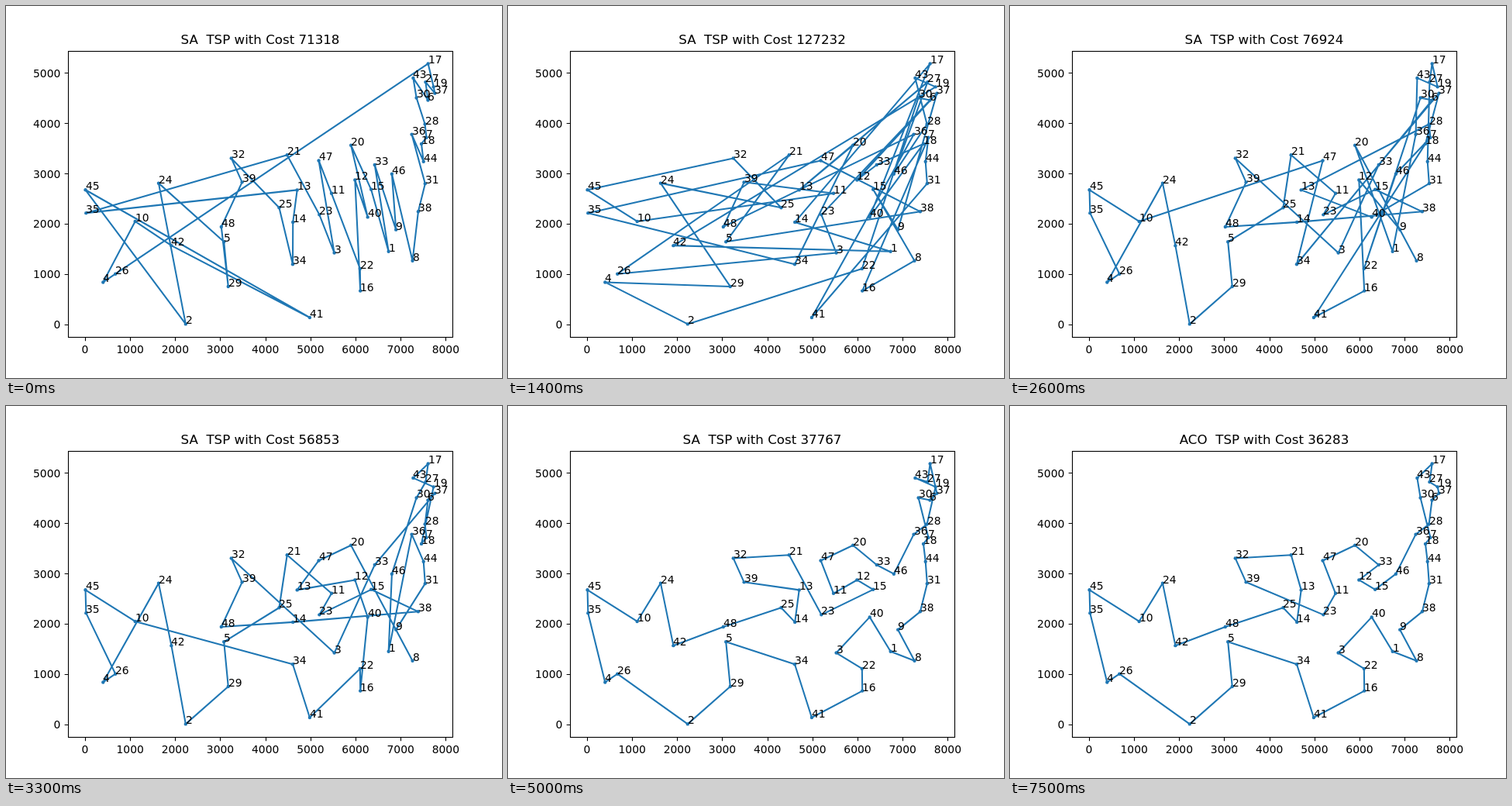
An HTML page with a canvas that plays this animation: 640 by 480 pixels, repeating every 10000 ms.

```html
<!DOCTYPE html>
<html lang="en">
<head>
<meta charset="utf-8">
<title>Travelling salesman tour</title>
<style>
  html, body { margin: 0; width: 100%; height: 100%; overflow: hidden; background: #fff; }
  canvas { display: block; }
</style>
</head>
<body>
<canvas id="plot" width="640" height="480"></canvas>
<script>
const ctx = document.getElementById('plot').getContext('2d');
const LOOP = 10000, STEP = 100;
const FONT = '"DejaVu Sans", sans-serif';
const BLUE = '#1f77b4';
const AXES = { left: 80, right: 576, top: 57.6, bottom: 427.2 };

const parse = text => text.trim().split(/\s+/).map(Number);

// The att48 data set: x and y of cities 1 to 48
const coords = parse(`
  6734 1453 2233 10 5530 1424 401 841 3082 1644 7608 4458 7573 3716 7265 1268
  6898 1885 1112 2049 5468 2606 5989 2873 4706 2674 4612 2035 6347 2683 6107 669
  7611 5184 7462 3590 7732 4723 5900 3561 4483 3369 6101 1110 5199 2182 1633 2809
  4307 2322 675 1006 7555 4819 7541 3981 3177 756 7352 4506 7545 2801 3245 3305
  6426 3173 4608 1198 23 2216 7248 3779 7762 4595 7392 2244 3484 2829 6271 2135
  4985 140 1916 1569 7280 4899 7509 3239 10 2676 6807 2993 5185 3258 3023 1942`);
const cities = Array.from({ length: 48 }, (_, i) => ({ x: coords[2 * i], y: coords[2 * i + 1] }));

const stages = [
  { at: 0, cost: 71318, ease: 0.3, tour: parse(`26 4 10 42 41 45 2 24 5 29 48 39 32 25 34 14
    13 35 21 23 3 47 11 22 16 12 40 20 15 1 33 9 46 8 38 31 36 44 18 7 28 30 43 6 27 37 19 17`) },
  { at: 800, cost: 128496, ease: 1, tour: parse(`45 10 6 34 47 11 46 26 1 32 3 42 35 29 19 43
    25 21 27 13 20 2 5 39 48 33 12 37 9 15 8 16 38 7 44 31 41 36 18 40 17 14 22 23 30 28 24 4`) },
  { at: 2000, cost: 120529, ease: 1, tour: parse(`36 48 39 11 10 45 32 25 24 29 4 2 22 30 6 23
    3 26 21 5 38 47 35 34 15 14 42 46 7 28 13 40 31 44 27 17 19 43 33 1 20 8 9 12 16 41 18 37`) },
  { at: 3300, cost: 56853, ease: 1, tour: parse(`45 35 26 4 24 42 2 29 5 25 21 11 23 15 38 14
    48 39 32 3 33 37 6 28 7 18 19 43 17 27 30 46 1 36 44 31 9 8 20 47 13 12 40 16 22 41 34 10`) },
  { at: 4100, cost: 43994, ease: 1, tour: parse(`45 24 10 42 48 25 14 13 39 32 21 23 15 12 11 47
    20 33 46 44 28 19 43 27 17 37 6 30 36 18 7 31 40 22 16 41 3 8 1 9 38 34 5 29 2 4 26 35`) },
  { at: 5900, cost: 36283, ease: 1, tour: parse(`30 7 18 44 31 38 9 8 1 40 3 22 16 41 34 5
    29 2 26 4 35 45 10 24 42 48 25 14 13 21 32 39 23 11 47 20 33 12 15 46 36 28 6 37 19 27 17 43`) }
];

const xs = cities.map(c => c.x), ys = cities.map(c => c.y);

// Linear scale with a 5% margin on both sides of the data
function scale(values, from, to) {
  const min = Math.min(...values), max = Math.max(...values), pad = (max - min) * 0.05;
  return v => from + (v - min + pad) / (max - min + 2 * pad) * (to - from);
}
const px = scale(xs, AXES.left, AXES.right);
const py = scale(ys, AXES.bottom, AXES.top);
const snap = v => Math.floor(v + 0.5) + 0.5;

function tourCost(tour) {
  return tour.reduce((sum, id, i) => {
    const a = cities[id - 1], b = cities[tour[(i + 1) % tour.length] - 1];
    return sum + Math.hypot(a.x - b.x, a.y - b.y);
  }, 0);
}

// Moves one tour towards another by segment reversals
function blend(from, to, progress) {
  const start = from.indexOf(to[0]);
  const tour = from.slice(start).concat(from.slice(0, start));
  const moves = Math.round(progress * tour.length);
  for (let i = 0; i < moves; i++) {
    const j = tour.indexOf(to[i]);
    tour.splice(i, j - i + 1, ...tour.slice(i, j + 1).reverse());
  }
  return tour;
}

function stateAt(time) {
  const t = Math.floor(time / STEP) * STEP;
  let k = stages.length - 1;
  while (stages[k].at > t) k--;
  const now = stages[k], next = stages[k + 1];
  if (!next || now.at === t) return now;
  const progress = ((t - now.at) / (next.at - now.at)) ** now.ease;
  const tour = blend(now.tour, next.tour, progress);
  return { tour, cost: Math.round(tourCost(tour)) };
}

function label(text, x, y, align = 'left', size = 13.89) {
  ctx.font = `${size}px ${FONT}`;
  ctx.textAlign = align;
  ctx.fillText(text, x, y);
}

function drawTour(tour) {
  ctx.strokeStyle = ctx.fillStyle = BLUE;
  ctx.lineWidth = 2.083;
  ctx.lineJoin = 'round';
  ctx.beginPath();
  for (const id of tour) ctx.lineTo(px(xs[id - 1]), py(ys[id - 1]));
  ctx.closePath();
  ctx.stroke();
  for (const c of cities) {
    ctx.beginPath();
    ctx.arc(px(c.x), py(c.y), 2.2, 0, 2 * Math.PI);
    ctx.fill();
  }
}

function drawAxes() {
  ctx.strokeStyle = ctx.fillStyle = '#000';
  ctx.lineWidth = 1.11;
  ctx.lineJoin = 'miter';
  const left = snap(AXES.left), right = snap(AXES.right);
  const top = snap(AXES.top), bottom = snap(AXES.bottom);
  ctx.strokeRect(left, top, right - left, bottom - top);
  ctx.beginPath();
  for (let v = 0; v <= 8000; v += 1000) {
    const x = snap(px(v));
    ctx.moveTo(x, bottom);
    ctx.lineTo(x, bottom + 4.86);
    label(v, px(v), 448, 'center');
  }
  for (let v = 0; v <= 5000; v += 1000) {
    const y = snap(py(v));
    ctx.moveTo(left, y);
    ctx.lineTo(left - 4.86, y);
    label(v, 70.3, Math.round(py(v) + 5.3), 'right');
  }
  ctx.stroke();
}

function draw(time) {
  const { tour, cost } = stateAt(time);
  ctx.fillStyle = '#fff';
  ctx.fillRect(0, 0, 640, 480);
  drawTour(tour);
  drawAxes();
  cities.forEach((c, i) => label(i + 1, Math.round(px(c.x)), Math.round(py(c.y))));
  const method = time < 7500 ? 'SA' : 'ACO';
  label(`${method}  TSP with Cost ${cost}`, 328, 49, 'center', 16.67);
}

function tick() {
  draw(performance.now() % LOOP);
  requestAnimationFrame(tick);
}
tick();
</script>
</body>
</html>
```
